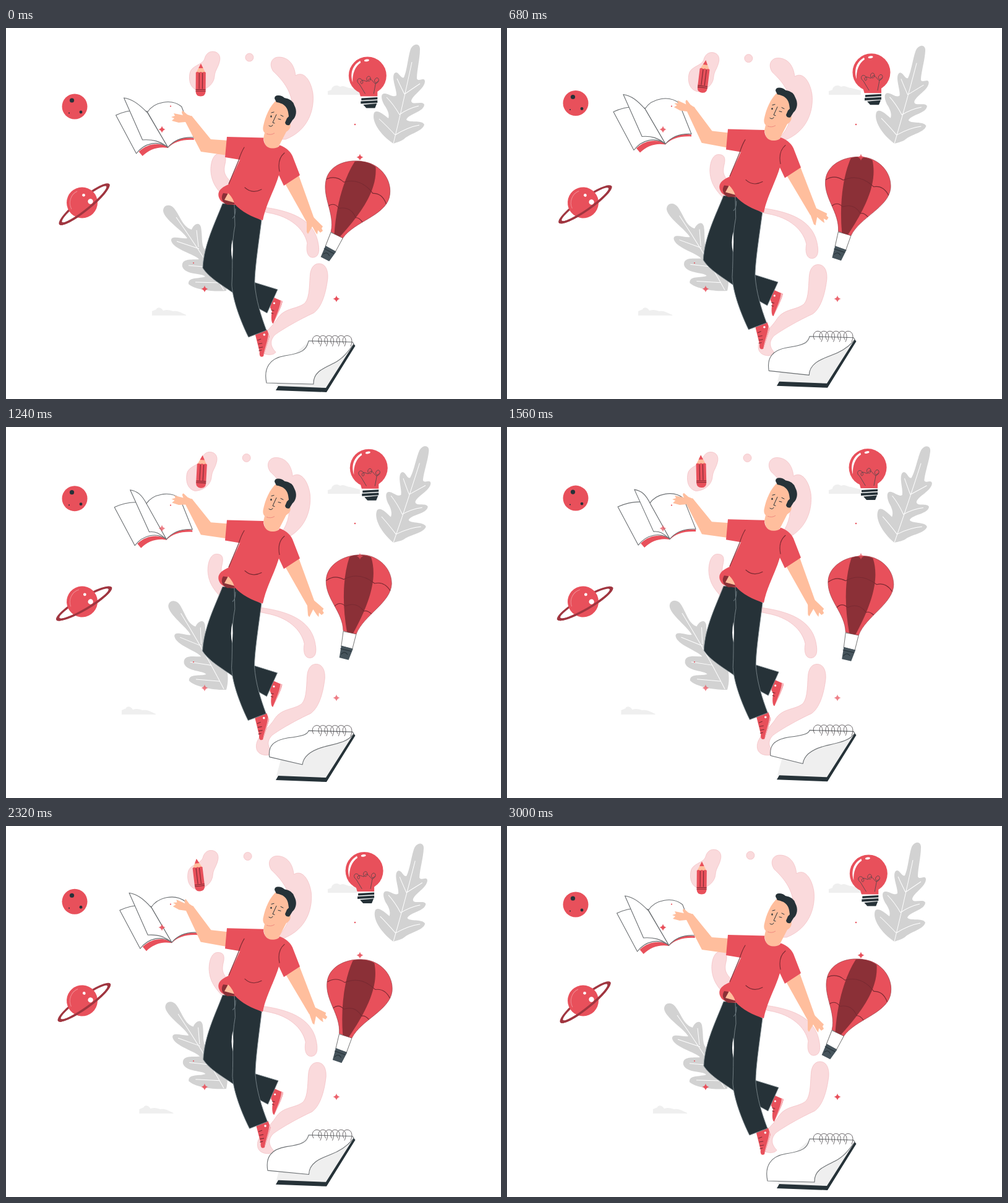
An HTML page that plays this animation: 800x600 px, repeating every 3040 ms.

```html
<!DOCTYPE html>
<html lang="en">
<head>
<meta charset="utf-8">
<style>
  html, body { margin: 0; width: 100%; height: 100%; overflow: hidden; background: #fff; }
  svg { display: block; width: 800px; height: 600px; }
  .red { fill: #e8505b; }
  .ink { fill: #263238; }
  .wine { fill: #8b3037; }
  .skin { fill: #ffbe9d; }
  .white { fill: #fff; }
  .grey { fill: #d2d2d2; }
  .pale { fill: #efefef; }
  .pink { fill: #fadadc; stroke: #f3bcc0; stroke-width: .7; }
  .line { fill: none; stroke: #263238; stroke-linecap: round; }
  .thin { fill: none; stroke: #4a4448; stroke-width: .8; stroke-linecap: round; }
  .seam { fill: none; stroke: #7a2a32; stroke-width: 1.1; stroke-linecap: round; }
  .vein { fill: none; stroke: #fff; }
  .page { fill: #fff; stroke: #6b6f72; stroke-width: 1.1; stroke-linejoin: round; }
</style>
</head>
<body>
<svg viewBox="0 0 800 600">
  <g id="leafR">
    <path class="grey" d="M626 187C604 172 590 150 595 137C600 131 610 140 618 146C620 140 617 132 611 124C605 112 606 105 613 106C620 107 626 113 631 109C632 100 622 80 628 73C634 68 638 83 643 80C648 70 650 45 654 34C659 24 669 25 669 34C669 50 664 68 664 82C667 88 676 78 677 86C677 98 657 108 655 118C656 126 673 117 676 124C675 136 652 138 647 148C650 154 672 148 676 156C674 166 656 170 645 178C640 183 634 184 626 187Z"/>
    <path class="vein" d="M626 187Q640 130 656 55M629 173Q614 157 603 147M629 173Q650 160 668 157M636 140Q626 123 615 112M636 140Q650 130 667 126M644 107Q637 93 632 82M644 107L669 90"/>
  </g>
  <g id="leafL">
    <path class="grey" d="M356 425C340 427 305 424 295 414C294 402 312 406 322 402C318 396 290 400 285 386C283 372 300 375 312 374C306 366 270 358 267 344C266 334 285 342 293 340C286 328 256 310 254 296C254 285 266 284 272 292C282 305 286 322 300 326C303 318 312 312 315 322C318 338 315 350 321 358C328 352 338 345 345 353C350 380 362 400 356 425Z"/>
    <path class="vein" d="M352 424Q320 370 275 306M345 412L306 411M330 387L295 384M312 357L276 345M311 354L308 327"/>
  </g>
  <g id="trail" class="pink">
    <path d="M334 38C343 38 348 45 345 55C342 66 338 68 337 78C336 92 322 101 310 101C299 98 295 87 297 74C299 60 318 60 321 50C323 42 328 38 334 38Z"/>
    <circle cx="393.5" cy="47.5" r="6.5"/>
    <path d="M441 47C455 47 466 57 468 77C480 69 492 82 496 105C499 130 490 165 452 180H440C455 165 463 150 463 125C461 100 445 82 432 70C424 58 430 47 441 47Z"/>
    <path d="M345 203C336 203 331 215 331 230C332 252 343 265 365 285L425 299C460 305 482 325 487 348C484 365 490 372 497 371C505 370 507 362 505 350C500 315 470 297 418 290L375 262C356 240 350 238 354 220C357 208 354 203 345 203Z"/>
    <path d="M506 381C516 381 521 391 520 405C517 430 510 452 497 461C475 471 447 487 435 496C426 505 427 515 436 524C434 530 414 531 410 519C405 500 428 488 440 468C452 452 470 455 483 445C492 435 490 410 492 396C494 386 499 381 506 381Z"/>
  </g>
  <path class="pale" d="M520 108V102L526 100C526 95 533 90 540 95C547 92 550 97 556 97L572 101V108Z"/>
  <path id="cloud" class="pale" d="M236 465V458L243 455C244 451 251 451 254 457C260 455 264 456 270 458C278 457 282 460 291 464V465Z"/>

  <g id="moon">
    <circle class="red" cx="111" cy="127" r="20.5"/>
    <g class="ink"><circle cx="106.5" cy="117" r="3.6"/><circle cx="121" cy="136" r="2.4"/><circle cx="102" cy="137.5" r="1"/></g>
  </g>
  <g id="saturn">
    <g transform="translate(126.5 285) rotate(-39)" fill="#a03640">
      <path fill-rule="evenodd" d="M-52 0A52 11 0 0 1 52 0A52 11 0 0 1 -52 0ZM-46 0A46 7.5 0 0 0 46 0A46 7.5 0 0 0 -46 0Z"/>
    </g>
    <circle class="red" cx="123" cy="282.5" r="25"/>
    <path d="M106 293A21 21 0 0 1 115 264" fill="none" stroke="#f08a91"/>
    <circle class="white" cx="125.5" cy="270.3" r="2.4"/><circle class="white" cx="136.5" cy="280.5" r="4.2"/>
    <path transform="translate(126.5 285) rotate(-39)" fill="#a03640" d="M-52 0A52 11 0 0 0 52 0H46A46 7.5 0 0 1 -46 0Z"/>
  </g>

  <g id="pencil">
    <path class="skin" d="M306.5 73L314.5 58L322.5 73Z"/>
    <path class="red" d="M310.8 65L314.5 57.5L318.2 65ZM306.5 72Q309 70 312 72Q314.5 70 317 72Q320 70 322.5 72V103Q322 110.5 314.5 110.5Q307 110.5 306.5 103Z"/>
    <path class="seam" d="M312 73V98M317.3 73V98M307 99.5H322M307 102H322"/>
  </g>

  <g id="bulb">
    <circle class="red" cx="584" cy="77" r="30.5"/>
    <path class="red" d="M569 98L573 112H600V98Z"/>
    <path class="white" d="M572 53C560 60 555 73 560 88C559 74 564 62 573 56ZM572 110.5H601V113H572Z"/>
    <ellipse class="white" cx="582.5" cy="52.5" rx="4" ry="1.8" transform="rotate(-10 582 52)"/>
    <path class="thin" d="M580 106L571 91C564 86 569 79 574 83C580 88 573 94 573 87C575 81 582 88 584 86C579 80 588 74 589 82C588 88 583 87 586 83C590 80 593 89 597 90C605 87 602 79 598 81C592 85 597 92 601 86M594 106L597 90"/>
    <path class="ink" d="M574 113.5L600 112V115.5L574 117ZM573 118.5L600 117V121L573 122.5ZM577 124L599 122L596 129.5H582Z"/>
  </g>

  <g id="balloon">
    <path class="white" stroke="#777" d="M547 332L544 356L562 360L568 336Z"/>
    <path class="red" stroke="#a03f48" stroke-width=".7" d="M572 208C597 206 624 225 624.5 254C624 285 580 305 568 336L547 331C546 300 518 280 518.5 250C519 225 545 209 572 208Z"/>
    <path class="wine" d="M556 211.5C563 207 582 207 591 211.5C600 240 595 275 563 335L553 333C545 290 545 245 556 211.5Z"/>
    <path class="seam" d="M519 250Q532 240 547 248Q572 234 597 254Q612 250 622 265M533 291Q541 283 550 291Q568 283 580 299Q585 297 592 303"/>
    <path fill="#46545c" d="M544 355L563 360L556 378L541 374.5Z"/>
    <path class="line" d="M543 360L560 364M544 369Q549 363 554 369"/>
  </g>

  <g id="book">
    <path class="red" d="M215 200C230 186 248 185 262 192C275 179 290 176 304 178V181C286 180 272 184 262 194C247 191 232 196 221 207Z"/>
    <path class="page" d="M178 141L211 203C224 186 246 181 262 193L229 135Q204 129 178 141Z"/>
    <path class="page" d="M229 136C240 119 268 114 284 127L304 177C288 176 273 180 262 193Z"/>
    <path id="leafPage" class="page"/>
  </g>

  <g id="man">
    <g id="legs">
      <path class="red" d="M431 435L447 442C445 452 438 465 432 478C429 478 428 468 430 458L427 452Z"/>
      <path fill="#f7b5ba" d="M444 440L447 442C445 452 438 465 432 478C438 462 443 452 444 440Z"/>
      <path class="red" d="M403 496L422 488L426 499L416 531C412 533 409 531 410 524Z"/>
      <path fill="#f7b5ba" d="M424 494L426 499L416 531C417 520 423 508 424 494Z"/>
      <path class="seam" d="M429 456L433 457M429 461L432 462M407 505L412 503M408 511L414 510M409 517L415 516M409 522L413 521"/>
      <circle class="white" cx="433.5" cy="445" r="1.6"/><circle class="white" cx="417.5" cy="496" r="1.8"/>
      <g class="ink" stroke="#7b878c" stroke-width=".9">
        <path d="M400 411L439 423L422 461L411 455L390 440L385 400Z"/>
        <path d="M350 284C338 315 320 350 318 388C328 404 350 416 368 429L385 390L374 284Z"/>
        <path d="M369 284L413 311C408 350 402 390 402 413C404 440 412 465 421 489L392 500C375 465 366 435 365 415C367 380 364 350 370 320Z"/>
      </g>
      <path class="white" d="M366 342Q362 360 366 375Q367.5 358 366 342Z"/>
      <path fill="none" stroke="#66747b" d="M371 292Q371 305 366 308"/>
    </g>
    <g id="armR" class="skin">
      <path d="M450 250L473 238L498 308L487 316Z"/>
      <path id="handR" d="M486 314L497 306L512 321L510 324L512 328L508 331L504 327L503 334L500 330L495 321L488 333L486 330Z"/>
    </g>
    <g id="armL" class="skin">
      <path d="M360 182L331 180L300 142L289 150L315 200L358 206Z"/>
      <path id="handL" d="M301 143L293 140L286 134C283 134 284 138 286 141L271 138L273 142L267 144L272 146L268 150L279 153L290 152Z"/>
    </g>
    <path class="red" d="M362 252C346 258 340 266 345 276C348 283 358 286 370 286L376 268Z"/>
    <path class="wine" d="M351 267C346 275 350 283 358 286L371 285L358 268Z"/>
    <path class="skin" d="M359 267L353 278L375 284Z"/>
    <path class="skin" d="M419 165L416 178L420 195H438L442 189L457 160Z"/>
    <path class="red" d="M357 176L416 177.5C416 188 422 194.5 430 194.5C437 194.5 441 193 442 189.5C450 192 459 198 463 207L475 238L449 255L441 238C434 262 420 285 415 311C398 306 380 297 369 284C367 272 357 270 359 254L378 213L354 209Z"/>
    <path class="seam" d="M385 193Q380 201 376 214L360 252M386 258Q398 269 413 261M450 202Q438 212 442 232"/>
    <path class="skin" d="M438 116C426 126 419 143 415.5 160C414.5 168 418 171 426 172L449 169C457 168 462 160 459 153L458 128Z"/>
    <path d="M421 171Q428 174 434 170" fill="none" stroke="#f08a80"/>
    <path class="ink" d="M434 114Q434 109 440 109Q446 109 450 113Q463 115 466 125C471 134 469 144 463 149L458 157Q452 158 451 153L454 146L457 143C456 134 455 128 447 123Q440 120 437 120Z"/>
    <path class="line" d="M437 140L431 153L434 154M425 158Q429 161 431 157M429 137L433 136M444 141L448 143M440 147L444 148"/>
    <ellipse class="ink" cx="428.5" cy="143" rx="1.2" ry="1.7"/>
  </g>

  <g id="pad">
    <path class="pale" d="M446 546L437 579L517 583L562 510L489 507Z"/>
    <path class="ink" d="M436 586L440 579L517 582L562 511L564.5 514L518 589Z"/>
    <path id="sheet" class="page"/>
    <path id="rings" class="thin"/>
  </g>

  <g id="stars" class="red"></g>
  <g class="red"><circle cx="303" cy="380" r="1"/><circle cx="564" cy="156" r="1.2"/><circle cx="266" cy="126.5" r="1.1"/></g>
</svg>
<script>
const $ = id => document.getElementById(id);
const move = (id, value) => $(id).setAttribute('transform', value);
const shift = (id, x, y) => move(id, `translate(${x} ${y})`);
const turn = (id, angle, x, y) => move(id, `rotate(${angle} ${x} ${y})`);

// Blends every "a>b" pair of a path
const morph = (id, path, k) => $(id).setAttribute('d',
  path.replace(/([\d.]+)>([\d.]+)/g, (_, a, b) => +a + (b - a) * k));

const PAGE = 'M191>205 113 C204>216 115 214>223 122>120 229>231 137 L262 193 C250 183 238>246 180 221>236 181 Z';
const SHEET = 'M489 506 C486>488 521>511 478>481 526>514 451>456 530>517' +
  ' C426>432 534>521 416>424 550>530 421>426 574>547 L497>478 576>560' +
  ' C496>480 556>545 514>495 550>536 530>515 542>531 C546>541 534>525 555>553 520>523 562 511 L560 508 Z';

$('stars').innerHTML = [[572, 209], [252, 164], [321, 422], [534, 438]].map(([x, y]) =>
  `<path d="M${x} ${y - 5.5}q1 4.5 5.5 5.5q-4.5 1-5.5 5.5q-1-4.5-5.5-5.5q4.5-1 5.5-5.5z"/>`).join('');
$('rings').setAttribute('d', Array.from({ length: 6 }, (_, i) =>
  `M${497 + i * 9.8} 511c-4-6-1-13 5-13.5c8 0 10 9 6 17`).join(''));

function draw(now) {
  const angle = 2 * Math.PI * (now % 3040 + 30) / 3000;
  const rise = (1 - Math.cos(angle)) / 2;
  const early = rise ** .6;
  const sway = Math.sin(angle);
  const wave = sway * sway;

  turn('leafR', 5.8 * rise, 626, 187);
  turn('leafL', 3.8 * rise, 356, 425);
  shift('trail', -5 * early, 2.5 * early);
  shift('cloud', -52 * rise, 0);
  shift('moon', 0, -12 * rise);
  turn('saturn', 9 * rise, 123, 282.5);
  move('pencil', `translate(${1.2 * sway} ${-12.5 * rise}) rotate(${7 * sway} 314.5 104)`);
  shift('bulb', 5 * sway, -11.5 * rise);
  move('balloon', `translate(${5.5 * (rise - 1) - 2.2 * sway} ${7 * (1 - rise) - 3.5 * sway})` +
    `rotate(${14.6 * (1 - early)} 571.5 263)`);
  shift('book', -6 * sway, -12 * rise);
  morph('leafPage', PAGE, rise * rise);

  shift('man', 0, -27 * rise);
  turn('legs', .4 * sway, 385, 270);
  turn('armL', 2.5 * wave, 357, 190);
  turn('handL', 11 * wave, 298, 146);
  turn('armR', -1.5 * wave, 452, 190);
  turn('handR', -18 * wave, 491, 311);

  shift('pad', 0, -15.8 * rise);
  morph('sheet', SHEET, rise);
  $('stars').setAttribute('opacity', 1 - .28 * rise);
  requestAnimationFrame(draw);
}
requestAnimationFrame(draw);
</script>
</body>
</html>
```
